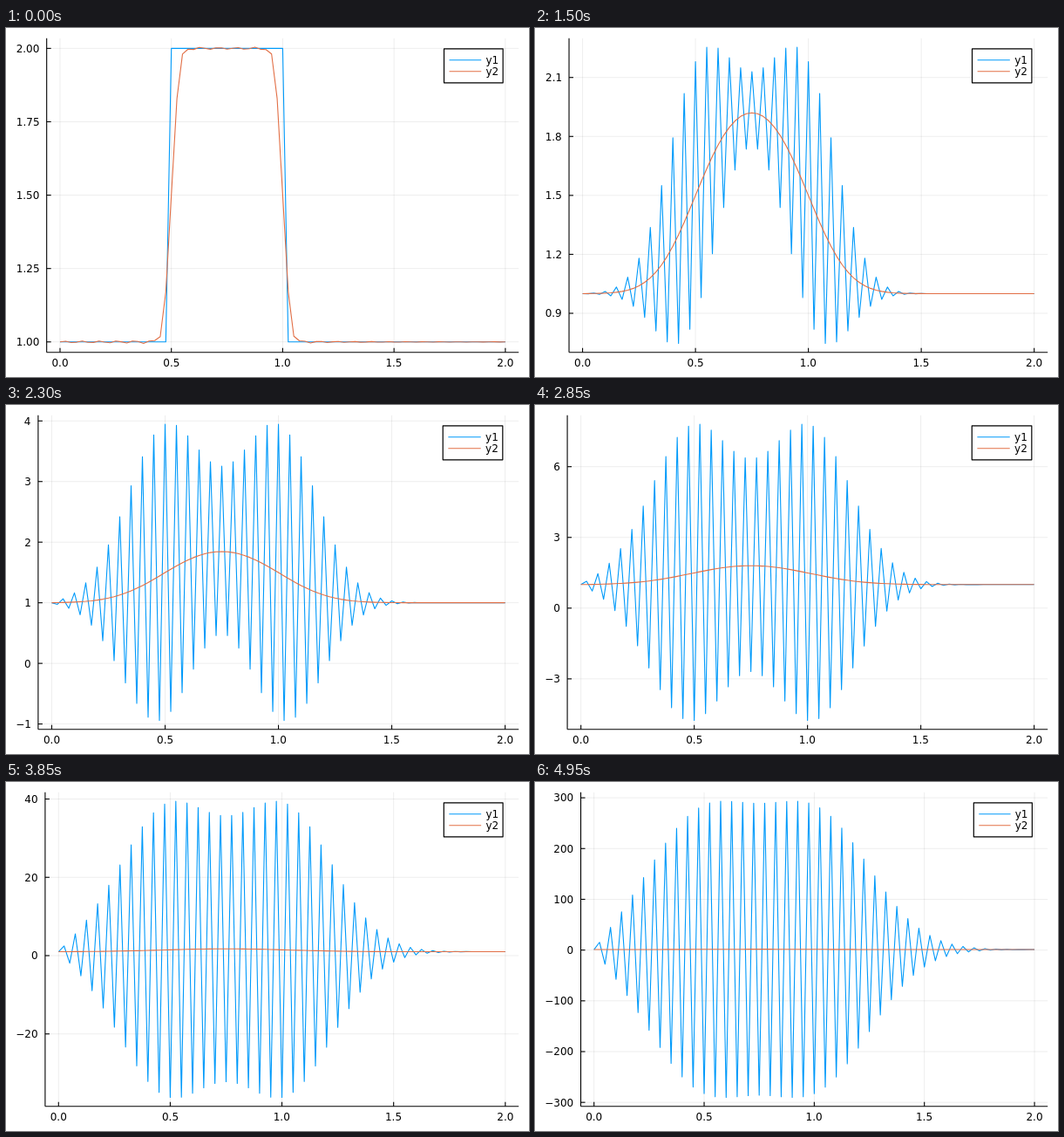
Animation, 600 px wide and 400 px high, one loop 5 s. Source, as an HTML page with a canvas:

```html
<!DOCTYPE html>
<html lang="en">
<head>
<meta charset="utf-8">
<title>Diffusion: explicit scheme and series solution</title>
<style>
  html, body { margin: 0; width: 100%; height: 100%; overflow: hidden; background: #fff; }
  canvas { display: block; width: 600px; height: 400px; }
</style>
</head>
<body>
<canvas id="plot" width="600" height="400"></canvas>
<script>
const ctx = document.getElementById('plot').getContext('2d');

// Heat equation on [0, 2] with both ends held at 1
const CELLS = 80, LENGTH = 2, DX = LENGTH / CELLS;
const STEPS = 100, STEP_MS = 50, MODES = 50;
const RATIO = 0.525;               // just above the stability limit of 0.5
const NU_DT = RATIO * DX * DX;

const TOP = 11.8, BOTTOM = 371.7, RIGHT = 588.2;
const FONT = '"DejaVu Sans", Verdana, sans-serif', SIZE = 12, CAP = 0.729 * SIZE;
const BLUE = '#009afa', ORANGE = '#e26f46';

const grid = Array.from({ length: CELLS + 1 }, (_, i) => i * DX);

function explicitStates() {
  const states = [grid.map((_, i) => (i >= 20 && i <= 40 ? 2 : 1))];
  while (states.length < STEPS) {
    const u = states[states.length - 1];
    states.push(u.map((v, i) =>
      i === 0 || i === CELLS ? 1 : v + RATIO * (u[i - 1] - 2 * v + u[i + 1])));
  }
  return states;
}

function seriesState(step) {
  const time = NU_DT * (step + 1);
  return grid.map(x => {
    let sum = 1;
    for (let n = 1; n <= MODES; n++) {
      const k = n * Math.PI / LENGTH;
      const weight = (Math.cos(k * 0.5) - Math.cos(k)) / k;
      sum += weight * Math.sin(k * x) * Math.exp(-k * k * time);
    }
    return sum;
  });
}

function chooseTicks(lo, hi) {
  const nice = [[5, 0.9], [3, 0.2], [2.5, 0.5], [2, 0.7], [1, 1]];
  const span = hi - lo, order = Math.floor(Math.log10(span));
  let best = { score: -Infinity };
  for (let z = order; z >= order - 1; z--) {
    for (const [q, quality] of nice) {
      const step = q * 10 ** z;
      const first = Math.ceil(lo / step), last = Math.floor(hi / step);
      const count = last - first + 1;
      if (count < 4 || count > 9) continue;
      const score = 0.25 * (1 - Math.abs(count - 5) / 5) + 0.25 * quality
        + 0.5 * span / ((count - 1) * step);
      if (score > best.score + 1e-9) best = { score, step, first, count, q, z };
    }
  }
  const digits = Math.max(0, (best.q === 2.5 ? 1 : 0) - best.z);
  return Array.from({ length: best.count }, (_, i) => {
    const value = (best.first + i) * best.step;
    const label = Math.abs(value).toFixed(digits);
    return { value, label: value < -1e-9 ? '\u2212' + label : label };
  });
}

// Ink extents, measured large to stay free of pixel rounding
function ink(text) {
  ctx.font = `${SIZE * 50}px ${FONT}`;
  ctx.textAlign = 'left';
  const m = ctx.measureText(text);
  const start = -m.actualBoundingBoxLeft / 50, end = m.actualBoundingBoxRight / 50;
  return { start, end, width: end - start };
}

// align: 0 = left, 0.5 = centre, 1 = right
function drawText(text, x, middle, align) {
  const box = ink(text);
  ctx.font = `${SIZE}px ${FONT}`;
  ctx.fillStyle = '#000';
  ctx.fillText(text, x - box.start - align * box.width, middle + CAP / 2);
}

function stroke(points, color, width) {
  ctx.beginPath();
  points.forEach(([x, y]) => ctx.lineTo(x, y));
  ctx.strokeStyle = color;
  ctx.lineWidth = width;
  ctx.stroke();
}

function drawLegend(left) {
  const unit = (RIGHT - left) / 45, row = 13;
  const right = RIGHT - (RIGHT - left) / 30, top = TOP + 12;
  const width = 4.5 * unit + ink('y1').width, x = right - width;
  ctx.fillStyle = '#fff';
  ctx.fillRect(x, top, width, 3 * row);
  ctx.strokeStyle = '#000';
  ctx.lineWidth = 1.2;
  ctx.strokeRect(x, top, width, 3 * row);
  [['y1', BLUE], ['y2', ORANGE]].forEach(([name, color], i) => {
    const y = top + row * (i + 1);
    stroke([[x + unit / 2, y], [x + 3.55 * unit, y]], color, 1.1);
    drawText(name, x + 4 * unit, y, 0);
  });
}

const explicit = explicitStates();
const frames = explicit.map((y1, step) => {
  const y2 = seriesState(step), all = y1.concat(y2);
  const min = Math.min(...all), max = Math.max(...all), pad = 0.03 * (max - min);
  return { y1, y2, lo: min - pad, hi: max + pad, ticks: chooseTicks(min - pad, max + pad) };
});

function draw({ y1, y2, lo, hi, ticks }) {
  ctx.fillStyle = '#fff';
  ctx.fillRect(0, 0, 600, 400);

  const left = 11.8 + 9.6 + Math.max(...ticks.map(t => ink(t.label).width));
  const px = x => left + (x + 0.06) / 2.12 * (RIGHT - left);
  const py = y => BOTTOM - (y - lo) / (hi - lo) * (BOTTOM - TOP);
  const xTicks = [0, 0.5, 1, 1.5, 2];
  const faint = 'rgba(0,0,0,0.1)';

  xTicks.forEach(v => stroke([[px(v), TOP], [px(v), BOTTOM]], faint, 0.7));
  ticks.forEach(t => stroke([[left, py(t.value)], [RIGHT, py(t.value)]], faint, 0.7));

  stroke([[left, TOP], [left, BOTTOM]], '#000', 1.1);
  stroke([[left, BOTTOM], [RIGHT, BOTTOM]], '#000', 1.1);
  xTicks.forEach(v => {
    stroke([[px(v), BOTTOM], [px(v), BOTTOM - 5]], '#000', 1.1);
    drawText(v.toFixed(1), px(v), 383.5, 0.5);
  });
  ticks.forEach(t => {
    const y = py(t.value);
    stroke([[left, y], [left + 5, y]], '#000', 1.1);
    drawText(t.label, left - 9, y, 1);
  });

  ctx.lineJoin = 'round';
  stroke(y1.map((v, i) => [px(grid[i]), py(v)]), BLUE, 1.1);
  stroke(y2.map((v, i) => [px(grid[i]), py(v)]), ORANGE, 1.1);
  drawLegend(left);
}

const start = performance.now();
function tick() {
  const elapsed = Math.max(0, performance.now() - start);
  draw(frames[Math.floor(elapsed / STEP_MS) % STEPS]);
  requestAnimationFrame(tick);
}
tick();
</script>
</body>
</html>
```
